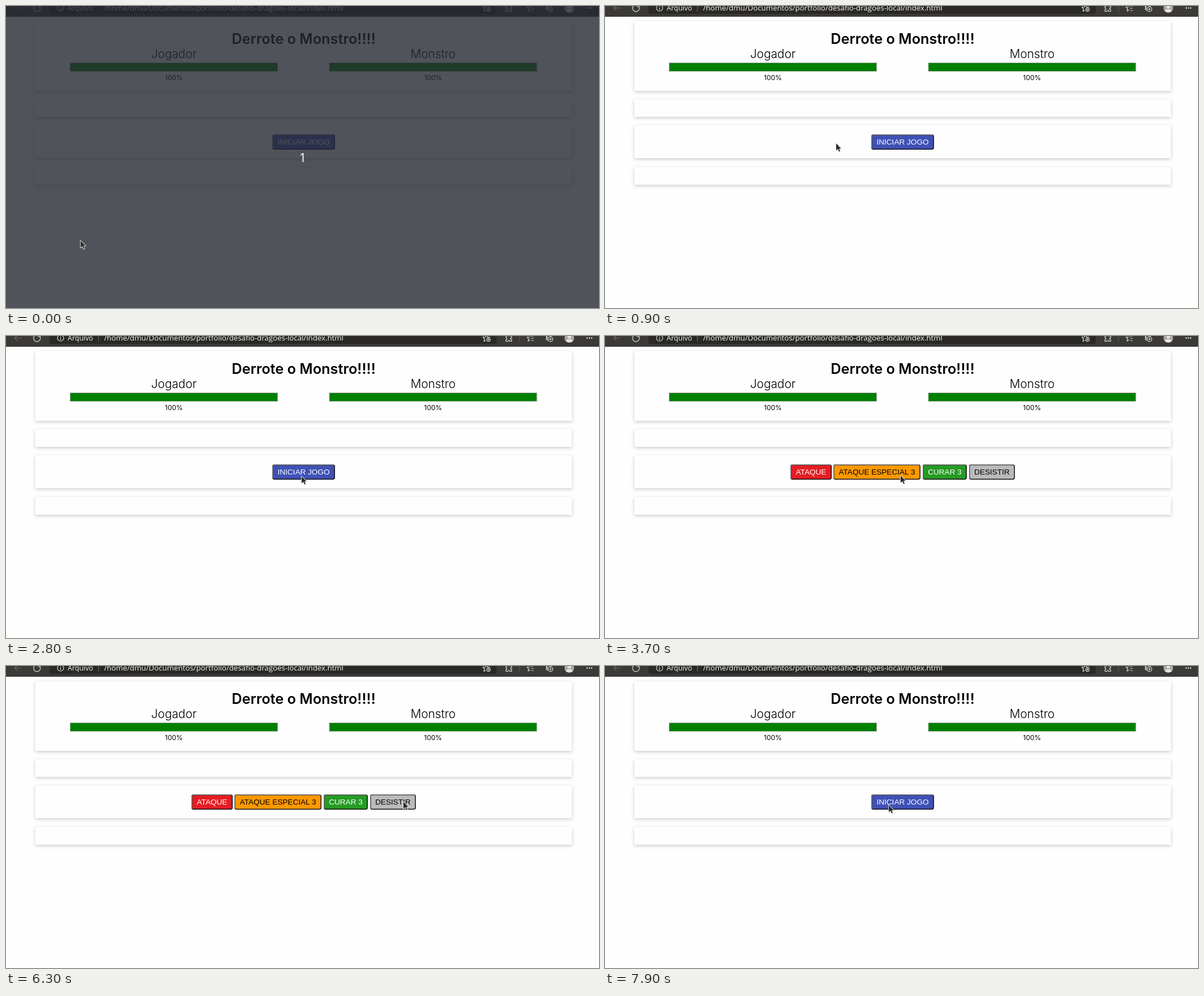
An HTML page for the animation above (8 s loop, 1049 px wide and 534 px high).

```html
<!DOCTYPE html>
<html lang="pt">
<head>
<meta charset="utf-8">
<title>Derrote o Monstro</title>
<style>
html, body { margin: 0; width: 100%; height: 100%; overflow: hidden; background: #fefefe; }
svg { display: block; width: 100%; height: 100%; }
text { white-space: pre; }
.mid { text-anchor: middle; }
.page { font-family: Inter, sans-serif; fill: #000; }
.bar { font-family: "Open Sans", "Noto Sans", sans-serif; fill: #f4f4f2; }
.btn { font: 13.6px "Liberation Sans", Arial, sans-serif; text-anchor: middle; }
.panel { fill: #fefefe; filter: drop-shadow(0 2px 3px rgba(0, 0, 0, .2)); }
.icon { fill: none; stroke: #d8d8d5; stroke-width: 1.2; stroke-linecap: round; stroke-linejoin: round; }
</style>
</head>
<body>
<svg viewBox="0 0 1049 534" xmlns="http://www.w3.org/2000/svg">
  <rect width="1049" height="534" fill="#fefefe"/>

  <g id="panels"></g>

  <g class="page">
    <text class="mid" x="526.5" y="66.5" font-size="25.3" font-weight="600">Derrote o Monstro!!!!</text>
    <g id="health"></g>
  </g>

  <g id="start"></g>
  <g id="fight"></g>

  <!-- browser toolbar -->
  <rect width="1049" height="19" fill="#3b3a38"/>
  <path d="M77 0H868V10Q868 14 864 14H81Q77 14 77 10Z" fill="#2a2927"/>
  <g class="icon">
    <path d="M27 3.5H15.500M20 -1L15.500 3.500L20 8" stroke="#6b6a68"/>
    <path d="M60 1A6 6 0 1 1 56 -2M60.500 -3V1H56.500"/>
    <circle cx="96.500" cy="3.500" r="5.500"/>
    <path d="M96.500 3V6.500M96.500 .6V.8"/>
    <path d="M163.500 -2V9" stroke="#666562"/>
    <path d="M848 8L845.500 9.500L846.500 5L843.500 2H848L850 -2L852 2H856"/>
    <circle cx="853.500" cy="6.500" r="3.200"/>
    <path d="M852 6.500H855M853.500 5V8"/>
    <path d="M884.500 0H888V-2H891V0H894.500V3.500H892.500V6H894.500V9.500H891V8H888V9.500H884.500V6H886V3.500H884.500Z"/>
    <path d="M908.500 -2V10" stroke="#5a5957"/>
    <path d="M926 2H921.500L924.500 4.500L923.500 9L927 7M928 0H933M929 4H933M930 8H933"/>
    <path d="M957 5V-2H964V1M959 7H956V0"/>
    <circle cx="963" cy="5.500" r="4.300"/>
    <path d="M960.800 5.500H965.200M963 3.300V7.700"/>
  </g>
  <circle cx="996.500" cy="3.500" r="8.500" fill="#aaa7a4"/>
  <circle cx="996.500" cy="1" r="3.200" fill="#e5e3e0"/>
  <path d="M990.500 9.500Q991 5.500 996.500 5.500T1002.500 9.500Q996.500 13 990.500 9.500Z" fill="#e5e3e0"/>
  <g fill="#e8e8e5">
    <circle cx="1028" cy="3.500" r="1.200"/>
    <circle cx="1032" cy="3.500" r="1.200"/>
    <circle cx="1036" cy="3.500" r="1.200"/>
  </g>
  <g class="bar">
    <text x="109" y="7.600" font-size="12.5" font-weight="500">Arquivo</text>
    <text x="173.500" y="7.600" font-size="13.25">/home/dmu/Documentos/portfolio/desafio-dragoes-local/index.html</text>
  </g>

  <g id="count">
    <rect width="1049" height="534" fill="rgb(38,40,50)" fill-opacity=".8"/>
    <text class="mid bar" x="525" y="276" font-size="22.5" style="fill:#fff">1</text>
  </g>

  <path id="cursor" d="M0 0V12.500L3 9.800L5 14.600L7 13.700L5 9.200H8.700Z"
        fill="#2a2a2a" stroke="#fff" stroke-width="1.6" stroke-linejoin="round"
        paint-order="stroke" style="filter:drop-shadow(0 .5px .6px rgba(0,0,0,.3))"/>
</svg>

<script>
const LOOP = 8000, STEP = 100;
const $ = id => document.getElementById(id);

const panel = (y, h) => `<rect class="panel" x="52" y="${y}" width="949" height="${h}"/>`;

const health = (name, x) => `
  <text class="mid" x="${x}" y="92" font-size="20.8" font-weight="300">${name}</text>
  <rect x="${x - 183.5}" y="100.5" width="367" height="15" fill="#008000" stroke="#a8a8a8"/>
  <text class="mid" x="${x}" y="131" font-size="12">100%</text>`;

// Bevelled button; the two border tones swap while it is held down
function button(label, x, w, fill, ink, pressed) {
  const tones = ["#747474", "#141414"];
  const [lit, shade] = pressed ? tones.reverse() : tones;
  const l = x + .75, r = x + w - .75, t = 227.75, b = 253.25;
  return `
  <rect x="${l}" y="${t}" width="${r - l}" height="${b - t}" rx="3" fill="${fill}" stroke="${shade}" stroke-width="1.5"/>
  <path d="M${l + .9} ${b - .9}Q${l} ${b - 1.5} ${l} ${b - 3}V${t + 3}Q${l} ${t} ${l + 3} ${t}H${r - 3}Q${r - 1.5} ${t} ${r - .9} ${t + .9}"
    fill="none" stroke="${lit}" stroke-width="1.5"/>
  <text class="btn" x="${x + w / 2}" y="245" fill="${ink}">${label}</text>`;
}

const startButton = pressed => button("INICIAR JOGO", 471, 111, "#3f51b5", "#fff", pressed);

$("panels").innerHTML = panel(27, 123) + panel(165, 31) + panel(211, 58) + panel(285, 31);
$("health").innerHTML = health("Jogador", 297) + health("Monstro", 755.5);
$("fight").innerHTML =
  button("ATAQUE", 328, 73, "#e51c23", "#fff") +
  button("ATAQUE ESPECIAL 3", 404, 154, "#ff9800", "#000") +
  button("CURAR 3", 562, 78, "#259b24", "#fff") +
  button("DESISTIR", 644, 81, "#bababa", "#000");

// Pointer path: time in steps, x, y
const path = [
  [4, 132, 415], [9, 409, 243], [12, 409, 243], [14, 430, 273], [18, 430, 273],
  [19, 437, 274], [20, 445, 277], [27, 519, 252], [28, 523, 248], [31, 523, 248],
  [32, 523, 247], [45, 523, 247], [48, 283, 122], [49, 276, 110], [50, 350, 112],
  [52, 657, 125], [53, 551, 241], [54, 611, 243], [58, 734, 228], [60, 728, 219],
  [63, 703, 240], [68, 703, 240], [70, 546, 247], [71, 546, 247], [73, 644, 259],
  [75, 540, 228], [76, 456, 236], [77, 503, 250], [78, 503, 250], [79, 502, 246]
];

function pointer(s) {
  const i = path.findIndex(p => p[0] >= s);
  if (i <= 0) return path[0].slice(1);
  const a = path[i - 1], b = path[i];
  const k = (s - a[0]) / (b[0] - a[0]);
  return [1, 2].map(n => Math.round(a[n] + (b[n] - a[n]) * k));
}

const show = (id, on) => $(id).setAttribute("display", on ? "inline" : "none");

let wasPressed;
function draw(t) {
  const playing = t >= 3700 && t < 6600;
  const pressed = t >= 3500 && t < 3700;
  if (pressed !== wasPressed) {
    $("start").innerHTML = startButton(pressed);
    wasPressed = pressed;
  }
  show("start", !playing);
  show("fight", playing);
  show("count", t < 100);
  $("cursor").setAttribute("transform", `translate(${pointer(Math.floor(t / STEP))})`);
}

function tick() {
  draw(performance.now() % LOOP);
  requestAnimationFrame(tick);
}
tick();
</script>
</body>
</html>
```
